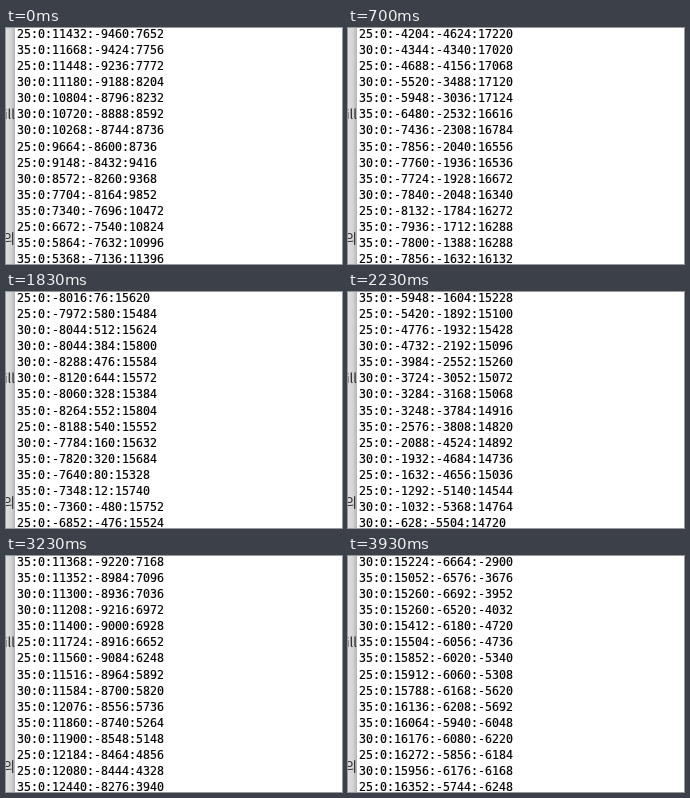
Animation of 336 by 236 pixels, one loop 3960 ms. Source, as an HTML page:

```html
<!DOCTYPE html>
<html lang="en">
<head>
<meta charset="utf-8">
<title>Sensor log</title>
<style>
html, body { margin: 0; width: 100%; height: 100%; overflow: hidden; background: #fff; }
svg { display: block; }
.log { font: 11.63px "DejaVu Sans Mono", monospace; fill: #000; stroke: #000; stroke-width: .15px; }
.side { font: 13px "Noto Sans CJK KR", "Noto Sans CJK", "Open Sans", sans-serif; fill: #222; text-anchor: end; }
</style>
</head>
<body>
<svg width="336" height="236" viewBox="0 0 336 236">
  <defs>
    <linearGradient id="edge">
      <stop offset="0" stop-color="#e0e0e0"/>
      <stop offset=".6" stop-color="#d2d2d2"/>
      <stop offset="1" stop-color="#b4b4b4"/>
    </linearGradient>
  </defs>
  <rect width="336" height="236" fill="#fff"/>
  <rect width="9" height="236" fill="url(#edge)"/>
  <text class="side" x="9" y="91">ill</text>
  <text class="side" x="9" y="215">의</text>
  <rect x="9" width="327" height="236" fill="#fff"/>
  <g class="log" id="log"></g>
</svg>
<script>
const LOOP = 3960, FPS = 30, ROWS = 15, PITCH = 16.08, ROWS_PER_FRAME = 1.5, JITTER = 500;

// The sensor turns slowly between these poses.
const poses = [
  { row: 0, axes: [11592, -9224, 7768] },
  { row: 32, axes: [-4136, -4392, 17220] },
  { row: 40, axes: [-7900, -1900, 16600] },
  { row: 57, axes: [-8160, -508, 15308] },
  { row: 90, axes: [-8100, 420, 15600] },
  { row: 120, axes: [-280, -5940, 14656] },
  { row: 146, axes: [11352, -9088, 6968] },
  { row: 192, axes: [16220, -5912, -6436] }
];

const smooth = t => t * t * (3 - 2 * t);

function random(row, channel) {
  const v = Math.sin(row * 12.9898 + channel * 78.233) * 43758.5453;
  return v - Math.floor(v);
}

function lineAt(row) {
  const next = poses.findIndex(pose => pose.row > row);
  const from = poses[next - 1], to = poses[next];
  const mix = smooth((row - from.row) / (to.row - from.row));
  const interval = 25 + 5 * Math.floor(random(row, 0) * 3);
  const axes = from.axes.map((start, i) => {
    const value = start + (to.axes[i] - start) * mix + (random(row, i + 1) - 0.5) * JITTER;
    return Math.round(value / 4) * 4;
  });
  return [interval, 0, ...axes].join(":");
}

const log = document.getElementById("log");
const lines = Array.from({ length: ROWS }, (_, i) => {
  const text = document.createElementNS("http://www.w3.org/2000/svg", "text");
  text.setAttribute("x", 11);
  text.setAttribute("y", 10 + i * PITCH);
  return log.appendChild(text);
});

function render(time) {
  // Frame times are rounded to 10 ms, so allow a slightly early change.
  const frame = Math.floor((time % LOOP) * FPS / 1000 + 0.15);
  const first = Math.round(Math.min(frame, 118) * ROWS_PER_FRAME);
  lines.forEach((text, i) => { text.textContent = lineAt(first + i); });
}

const begin = performance.now();
function tick() {
  render(performance.now() - begin);
  requestAnimationFrame(tick);
}
render(0);
requestAnimationFrame(tick);
</script>
</body>
</html>
```
